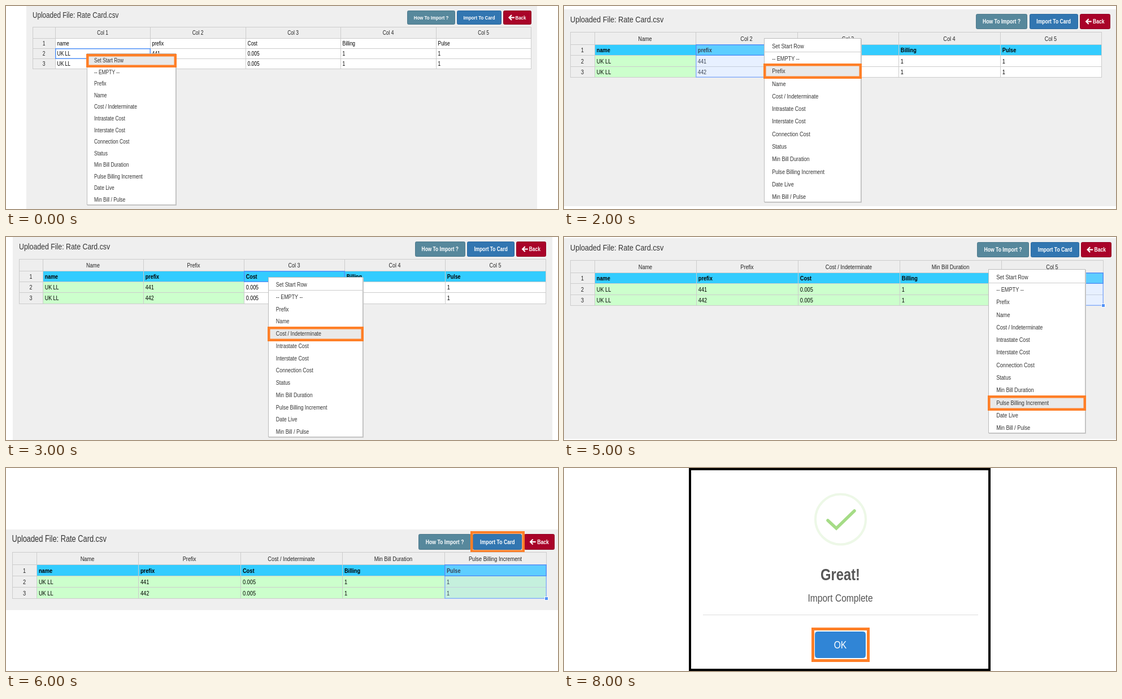
An HTML page with a canvas that plays this animation: 977 px wide and 360 px high, repeating every 9000 ms.

```html
<!DOCTYPE html>
<html>
<head>
<meta charset="utf-8">
<style>
html, body { margin: 0; width: 100%; height: 100%; overflow: hidden; background: #fff; }
canvas { display: block; }
</style>
</head>
<body>
<canvas id="stage" width="977" height="360"></canvas>
<script>
const ctx = document.getElementById('stage').getContext('2d');
const ORANGE = '#ff7f27', BLUE = '#5292f7';
const NARROW = 0.82; // condensed sans face
const HEAD = 50, TOP = 25.5, ROW = 22.8;

const fields = ['Name', 'Prefix', 'Cost / Indeterminate', 'Min Bill Duration', 'Pulse Billing Increment'];
const rows = [
  ['name', 'prefix', 'Cost', 'Billing', 'Pulse'],
  ['UK LL', '441', '0.005', '1', '1'],
  ['UK LL', '442', '0.005', '1', '1']
];
const items = ['Set Start Row', '-- EMPTY --', 'Prefix', 'Name', 'Cost / Indeterminate', 'Intrastate Cost',
  'Interstate Cost', 'Connection Cost', 'Status', 'Min Bill Duration', 'Pulse Billing Increment',
  'Date Live', 'Min Bill / Pulse'];

// table: left, top, right edge; right: edge of the buttons;
// mapped: named columns; pick: [column, first row, last row]; menu: [x, y, item]
const sheets = [
  { panel: [36, 0, 904, 360], table: [47, 37, 929], zoom: .79, right: 929.5, mapped: 0, plain: true, pick: [0, 1, 1], menu: [143, 84, 0] },
  { panel: [0, 1, 977, 358], table: [11, 41, 953], zoom: .857, right: 967, mapped: 0, pick: [0, 0, 2], menu: [150, 59, 3] },
  { panel: [0, 6, 977, 349], table: [11, 46, 951], zoom: .857, right: 966.5, mapped: 1, pick: [1, 0, 2], menu: [354, 57, 2] },
  { panel: [12, 0, 955, 360], table: [23, 39, 955], zoom: .836, right: 955.5, mapped: 2, pick: [2, 0, 0], menu: [464, 71, 4] },
  { panel: [0, 2, 977, 356], table: [11, 41, 954], zoom: .857, right: 968, mapped: 3, pick: [3, 0, 2], menu: [660, 58, 9] },
  { panel: [0, 2, 977, 356], table: [11, 41, 954], zoom: .857, right: 969, mapped: 4, pick: [4, 0, 2], menu: [751, 57, 10] },
  { panel: [0, 109, 977, 143], table: [10.5, 149, 956], zoom: .868, right: 971, mapped: 5, pick: [4, 0, 2] }
];

let zoom = 1;

function fill(color, x, y, w, h) {
  ctx.fillStyle = color;
  ctx.fillRect(x, y, w, h);
}

function frame(color, line, x, y, w, h) {
  ctx.strokeStyle = color;
  ctx.lineWidth = line;
  ctx.strokeRect(x + line / 2, y + line / 2, w - line, h - line);
}

function text(str, x, y, size, color, align = 'left', weight = 'normal') {
  ctx.save();
  ctx.transform(zoom * NARROW, 0, 0, zoom, x, y);
  ctx.font = `${weight} ${size}px "Liberation Sans", Arial, sans-serif`;
  ctx.fillStyle = color;
  ctx.textAlign = align;
  ctx.fillText(str, 0, size * .36);
  ctx.restore();
}

function rounded(color, border, x, y, w, h, r) {
  ctx.beginPath();
  ctx.roundRect(x + .5, y + .5, w - 1, h - 1, r);
  ctx.fillStyle = color;
  ctx.fill();
  ctx.strokeStyle = border;
  ctx.lineWidth = 1;
  ctx.stroke();
}

function path(color, width, points) {
  ctx.beginPath();
  points.forEach(p => ctx.lineTo(...p));
  ctx.strokeStyle = color;
  ctx.lineWidth = width;
  ctx.stroke();
}

function drawButtons(s) {
  const y = Math.round(s.table[1] - 37.3 * zoom), h = Math.round(31.7 * zoom), mid = y + h / 2;
  const X = u => Math.round(s.right - u * zoom);
  const button = (color, border, from, to) =>
    rounded(color, border, X(from), y, X(to) - X(from), h, 2);
  const label = (str, u, align) => text(str, s.right - u * zoom, mid, 12.2, '#fff', align, 'bold');
  button('#57889c', '#4e7a8c', 277.5, 170.5);
  button('#3276b1', '#2c699d', 166.5, 66.5);
  button('#a90329', '#900323', 62.5, 0);
  label('How To Import ?', 224, 'center');
  label('Import To Card', 116.5, 'center');
  label('Back', 35.5);
  const tip = s.right - 50 * zoom;
  path('#fff', 2.2, [[tip + 5, mid - 4.5], [tip + .5, mid], [tip + 5, mid + 4.5]]);
  path('#fff', 2.2, [[tip + 1, mid], [tip + 10, mid]]);
  if (!s.menu) frame(ORANGE, 4.5, X(166.5) - 4, y - 5, X(66.5) - X(166.5) + 9, h + 10);
}

function drawTable(s) {
  const [left, top, right] = s.table, first = left + HEAD * zoom, col = (right - first) / 5;
  const X = c => Math.round(c < 0 ? left : first + c * col);
  const Y = r => Math.round(r < 0 ? top : top + (TOP + r * ROW) * zoom);
  const midY = r => (Y(r) + Y(r + 1)) / 2 + .5;
  for (let r = -1; r < 3; r++) {
    for (let c = -1; c < 5; c++) {
      const x = X(c), y = Y(r), w = X(c + 1) - x, h = Y(r + 1) - y;
      const head = r < 0 || c < 0, start = r === 0 && !s.plain;
      fill(head ? '#eee' : start ? '#3cf' : c < s.mapped ? '#cfc' : '#fff', x, y, w, h);
      frame('#ccc', 1, x, y, w + 1, h + 1);
      if (head) {
        const label = r >= 0 ? r + 1 : c < 0 ? '' : c < s.mapped ? fields[c] : 'Col ' + (c + 1);
        text(label, x + w / 2, midY(r), 13, '#222', 'center');
      } else {
        text(rows[r][c], x + 4.5 * zoom, midY(r), 13, '#000', 'left', start ? 'bold' : 'normal');
      }
    }
  }
  const [c, from, to] = s.pick, x = X(c), w = X(c + 1) - x + 1, y = Y(from), bottom = Y(to + 1);
  if (to > from) {
    fill('rgba(181,209,255,.32)', x, y, w, bottom - y);
    frame('#89aff9', 1.5, x, y, w, bottom - y + 1);
  }
  frame(BLUE, 1.5, x, y, w, Y(from + 1) - y + 1);
  fill('#fff', x + w - 4, bottom - 3, 7, 7);
  fill(BLUE, x + w - 3, bottom - 2, 5, 5);
}

function drawMenu([x, y, active]) {
  const w = Math.round(200.5 * zoom), h = Math.round(340 * zoom);
  const mid = i => y + (16 + 26 * i) * zoom;
  fill('#ccc', x + 1, y + 1, w, h);
  fill('#fff', x, y, w, h);
  frame('#bbb', 1, x, y, w, h);
  fill('#ccc', x, Math.round(y + 27.5 * zoom), w, 1);
  const top = Math.round(mid(active) - 15 * zoom), tall = Math.round(31 * zoom);
  fill('#e9e9e9', x, top, w, tall);
  frame(ORANGE, 4.5, x - 1, top, w + 2, tall);
  items.forEach((item, i) => text(item, x + 16.5 * zoom, mid(i), 13, '#333'));
}

function drawSheet(s) {
  zoom = s.zoom;
  fill('#efefef', ...s.panel);
  text('Uploaded File: Rate Card.csv', s.table[0], s.table[1] - 26.8 * zoom, 18, '#333');
  drawButtons(s);
  drawTable(s);
  if (s.menu) drawMenu(s.menu);
}

function drawDialog(x, w, color, title, message) {
  zoom = 1;
  frame('#000', 4, x, 0, w, 360);
  ctx.beginPath();
  ctx.arc(489.5, 91, 44.5, 0, 7);
  ctx.strokeStyle = color;
  ctx.lineWidth = 4;
  ctx.stroke();
  text(title, 489, 189, 29, '#575757', 'center', 'bold');
  text(message, 489, 230, 19, '#555', 'center');
  fill('#ddd', 246, 260, 487, 1);
}

function choice(label, color, x, w) {
  rounded(color, color, x, 290, w, 47, 4);
  text(label, x + w / 2, 313.5, 19, '#fff', 'center');
}

function drawConfirm() {
  drawDialog(217, 543, '#f8bb86', 'Are you sure?', 'Import To Card');
  fill('#f8bb86', 487, 64, 5, 36);
  fill('#f8bb86', 487, 108, 5, 6);
  choice('Yes', '#3085d6', 391, 89);
  choice('Cancel', '#aaa', 500, 89);
  frame(ORANGE, 5, 384, 283, 103, 61);
}

function drawDone() {
  drawDialog(221, 534, '#edf8e7', 'Great!', 'Import Complete');
  ctx.lineCap = 'round';
  path('#a5dc86', 5.5, [[467, 93], [482, 107], [514, 76]]);
  ctx.lineCap = 'butt';
  choice('OK', '#3085d6', 444, 90);
  frame(ORANGE, 5, 438, 283, 103, 61);
}

const begin = performance.now();
function draw() {
  const step = Math.floor((performance.now() - begin) % 9000 / 1000);
  fill('#fff', 0, 0, 977, 360);
  if (step < 7) drawSheet(sheets[step]);
  else if (step === 7) drawConfirm();
  else drawDone();
  requestAnimationFrame(draw);
}
draw();
</script>
</body>
</html>
```
